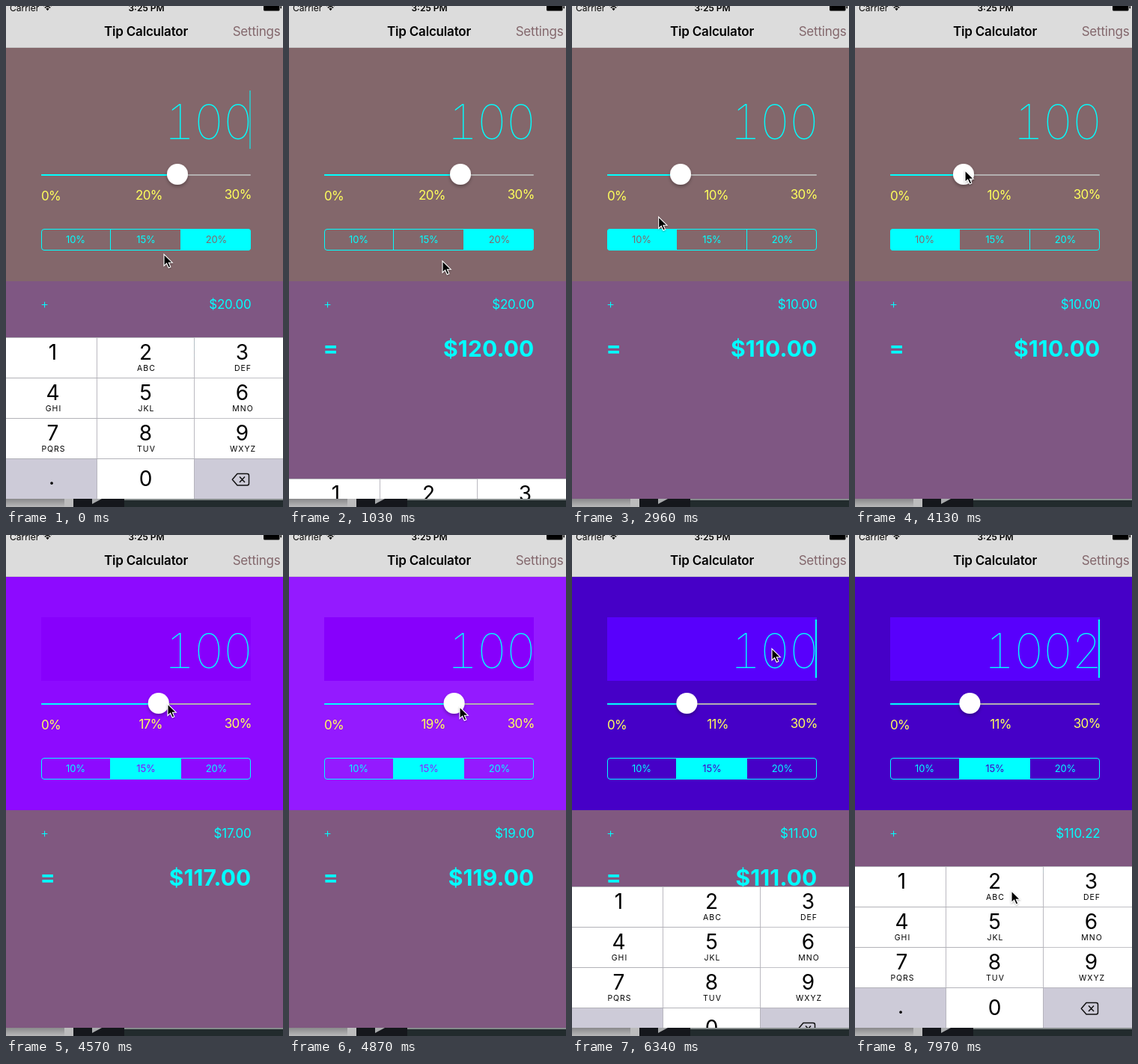
Write an HTML page that moves like this. It is 370 px wide and 670 px high and loops after 8000 ms.

```html
<!DOCTYPE html>
<html lang="en">
<head>
<meta charset="utf-8">
<title>Tip Calculator</title>
<style>
  html, body { margin: 0; width: 100%; height: 100%; overflow: hidden; background: #222; }
  svg { display: block; width: 370px; height: 670px; }
  text { font: 17px Inter, "Liberation Sans", sans-serif; letter-spacing: -.012em; white-space: pre; }
  .cyan { fill: #0ff; }
  .pct { fill: #ffff5c; letter-spacing: -.04em; }
  .end { text-anchor: end; }
  .mid { text-anchor: middle; }
  .title { font-weight: 600; }
  .status { font-size: 12px; letter-spacing: 0; }
  .amount { font-size: 64px; font-weight: 100; letter-spacing: -.0375em; font-variant-numeric: tabular-nums; }
  .total { font-size: 30px; font-weight: 700; letter-spacing: .005em; }
  .plus { font-weight: 300; }
  .seg { font-size: 13px; }
  .digit { font-size: 28px; letter-spacing: 0; }
  .abc { font-size: 10.5px; letter-spacing: 1px; }
</style>
</head>
<body>
<svg viewBox="0 0 370 670">
  <defs>
    <clipPath id="screen"><rect width="370" height="659"/></clipPath>
    <clipPath id="pill"><rect x="47" y="298" width="280" height="29" rx="4"/></clipPath>
    <linearGradient id="desk" x2="0" y2="1">
      <stop stop-color="#858587"/><stop offset="1" stop-color="#b9b9ba"/>
    </linearGradient>
    <filter id="soft" x="-50%" y="-50%" width="200%" height="200%">
      <feDropShadow dx="0" dy="2.5" stdDeviation="2" flood-opacity=".3"/>
    </filter>
    <filter id="faint" x="-50%" y="-50%" width="200%" height="200%">
      <feDropShadow dx="0" dy="1" stdDeviation=".8" flood-opacity=".35"/>
    </filter>
  </defs>

  <!-- desktop behind the phone -->
  <rect y="658" width="90" height="12" fill="url(#desk)"/>
  <rect x="78" y="659" width="12" height="11" fill="#bcbcbd"/>
  <rect x="90" y="659" width="68" height="11" fill="#15171c"/>
  <rect x="158" y="659" width="212" height="11" fill="#222b2d"/>
  <rect x="158" y="659" width="212" height="2" fill="#858b8b"/>
  <path d="M115 659h13l-13 7z" fill="#a9abad"/>

  <g clip-path="url(#screen)">
    <rect id="top" y="56" width="370" height="312"/>
    <rect id="bottom" y="368" width="370" height="291"/>
    <rect id="field" x="47" y="110" width="280" height="85"/>

    <rect width="370" height="56" fill="#dcdcdc"/>
    <rect y="55.5" width="370" height=".5" fill="#0003"/>
    <text class="status" x="5" y="6.5">Carrier</text>
    <g fill="none" stroke="#000" stroke-width="1.5">
      <path d="M49.8 0Q55.5 -4 61.2 0M51.8 2.3Q55.5 -.6 59.2 2.3"/>
      <path d="M53.3 3.6Q55.5 2 57.7 3.6L55.5 6.2z" fill="#000" stroke="none"/>
    </g>
    <text class="status mid title" x="187.5" y="6.5">3:25 PM</text>
    <rect x="344" y="-3" width="21.5" height="9.5" rx="1.5"/>
    <rect x="366.5" y="0" width="1.5" height="3.5" rx=".7"/>
    <text class="title mid" x="187" y="40">Tip Calculator</text>
    <text class="end" x="366.5" y="40" fill="#83676c">Settings</text>

    <text id="amount" class="amount cyan end" x="328" y="178"></text>
    <rect id="caret" class="cyan" x="325" y="113" width="2" height="78"/>

    <rect x="47" y="225" width="280" height="2" rx="1" fill="#b3b0b0"/>
    <rect id="fill" class="cyan" x="47" y="225" height="2" rx="1"/>
    <circle id="thumb" cy="225" r="14" fill="#fff" filter="url(#soft)"/>
    <text class="pct" x="47" y="260">0%</text>
    <text id="rate" class="pct end" x="208.7" y="259"></text>
    <text class="pct end" x="327.7" y="258">30%</text>

    <g id="segs" clip-path="url(#pill)"></g>
    <path d="M139.5 298v29M233.5 298v29" stroke="#0ff"/>
    <rect x="47.5" y="298.5" width="279" height="28" rx="3.5" fill="none" stroke="#0ff"/>

    <text class="cyan plus" x="46" y="404">+</text>
    <text id="tip" class="cyan end" x="327.5" y="405"></text>
    <text class="cyan total" x="45.5" y="468">=</text>
    <text id="total" class="cyan total end" x="327.5" y="469"></text>

    <g id="pad"></g>
  </g>
  <path id="cursor" d="M0 0V15.5L3.6 12.2L6.2 18L8.8 16.9L6.3 11.2H11.2Z"
    stroke="#fff" stroke-width="1.1" filter="url(#faint)"/>
</svg>
<script>
const $ = id => document.getElementById(id);
const LOOP = 8000, STEP = 147.5;
const clamp = (n, lo = 0, hi = 1) => Math.min(hi, Math.max(lo, n));
const money = n => '$' + n.toFixed(2);

function add(parent, tag, attrs, text) {
  const el = document.createElementNS('http://www.w3.org/2000/svg', tag);
  for (const name in attrs) el.setAttribute(name, attrs[name]);
  if (text) el.textContent = text;
  return parent.appendChild(el);
}
function set(id, attrs) {
  for (const name in attrs) $(id).setAttribute(name, attrs[name]);
}

// Segmented control
const segs = [10, 15, 20].map((rate, i) => ({
  box: add($('segs'), 'rect', { x: 46 + 93.7 * i, y: 298, width: 93.7, height: 29, fill: '#0ff' }),
  label: add($('segs'), 'text', { class: 'seg mid', x: 93 + 94 * i, y: 317 }, rate + '%')
}));

// Number pad
const pad = $('pad'), keys = [];
const letters = ',ABC,DEF,GHI,JKL,MNO,PQRS,TUV,WXYZ'.split(',');
for (let i = 0; i < 12; i++) {
  const x = -8.5 + 130 * (i % 3), y = 443 + 54 * Math.floor(i / 3);
  const mid = 62.5 + 126.5 * (i % 3) - (i % 3 === 1 ? 2.5 : 0);
  const side = i === 9 || i === 11;
  keys.push(add(pad, 'rect', { x, y, width: 130, height: 54, fill: side ? '#cdcbd8' : '#fff' }));
  if (i < 9) {
    add(pad, 'text', { class: 'digit mid', x: mid, y: y + 30 }, String(i + 1));
    add(pad, 'text', { class: 'abc mid', x: mid + 1, y: y + 45 }, letters[i]);
  }
  add(pad, 'rect', { x: 0, y, width: 370, height: .8, fill: '#b2b2b8' });
}
add(pad, 'text', { class: 'digit mid', x: 186.5, y: 642 }, '0');
add(pad, 'text', { class: 'digit mid', x: 61, y: 640 }, '.');
add(pad, 'path', { d: 'M121.5 443V659M251.5 443V659', stroke: '#b2b2b8', 'stroke-width': .8 });
add(pad, 'path', {
  d: 'M309 625.5H322Q324.5 625.5 324.5 628V638.5Q324.5 641 322 641H309L302.3 633.3ZM312 629.5l7 7.4m0-7.4l-7 7.4',
  fill: 'none', stroke: '#111', 'stroke-width': 1.5, 'stroke-linejoin': 'round'
});

// Moments, in steps
const HIDE = 6, PICK15 = 10, PICK10 = 16, DRAG = 29, DROP = 38, SHOW = 42, PRESS = 50;

// Pointer stops: step, x, y
const stops = [
  [0, 211, 332], [5, 205, 341], [8, 205, 341], [10, 180, 313], [11, 126, 309], [13, 100, 313],
  [16, 100, 313], [28, 147, 220], [31, 216, 226], [33, 228, 230], [36, 189, 232],
  [DROP, 152, 229], [39, 261, 155], [40, 267, 152], [44, 267, 152], [49, 209, 476]
];
function pointer(k) {
  const i = stops.findIndex(s => s[0] > k);
  if (i < 0) return stops[stops.length - 1].slice(1);
  const a = stops[i - 1], b = stops[i], f = (k - a[0]) / (b[0] - a[0]);
  return [1, 2].map(n => a[n] + (b[n] - a[n]) * f);
}

// The slider follows the pointer with a short lag
function rateAt(k) {
  if (k < PICK15) return 20;
  if (k < PICK10) return 15;
  if (k < DRAG) return 10;
  return Math.round((pointer(Math.min(k, DROP) - .4)[0] - 66) / 8.4);
}

// The pad springs in and out, closing 7/8 of the gap each step
function padDrop(k) {
  if (k < HIDE) return 0;
  return Math.round(216 * (k < SHOW ? 1 - 8 ** (HIDE - k) : 8 ** (SHOW - k)));
}

function draw(k) {
  const rate = rateAt(k), amount = k > PRESS ? 1002 : 100, tinted = k >= DRAG;
  const hue = Math.min(272, 261 + 2.25 * (rate - 11));
  const light = 39 + 1.5 * (rate - 11) + 2 * clamp(rate - 15, 0, 2);
  const back = tinted ? `hsl(${hue},100%,${light}%)` : '#83676b';
  set('top', { fill: back });
  set('bottom', { fill: tinted ? '#805880' : '#7f5783' });
  set('field', { fill: tinted ? `hsl(${hue},100%,49.5%)` : 'none' });

  const x = 61 + 8.4 * rate;
  set('fill', { width: x - 47 });
  set('thumb', { cx: x });
  $('rate').textContent = rate + '%';
  $('amount').textContent = amount;
  $('tip').textContent = money(amount * rate / 100);
  $('total').textContent = money(amount * (1 + rate / 100));

  const chosen = rate <= 10 ? 0 : rate < 20 ? 1 : 2;
  const fade = k < PICK15 ? 0 : 8 ** (PICK15 - .2 - k);
  segs.forEach(({ box, label }, i) => {
    box.setAttribute('opacity', i === chosen ? 1 - fade / 2 : i === 2 ? fade : 0);
    label.setAttribute('fill', i === chosen ? back : '#0ff');
  });

  const focused = k <= HIDE || k > SHOW;
  const blink = clamp(.1 + Math.cos(2 * Math.PI * (k - SHOW - 1) / 5.5));
  set('caret', { opacity: focused ? blink : 0 });
  set('pad', { transform: `translate(0 ${padDrop(k)})` });
  keys[1].setAttribute('fill', k === PRESS ? '#cdcbd8' : '#fff');
  set('cursor', { transform: `translate(${pointer(k)})` });
}

const start = performance.now();
let last = -1;
function tick() {
  const t = (performance.now() - start) % LOOP;
  const k = Math.floor((t + 10) / STEP);
  if (k !== last) draw(last = k);
  requestAnimationFrame(tick);
}
tick();
</script>
</body>
</html>
```
